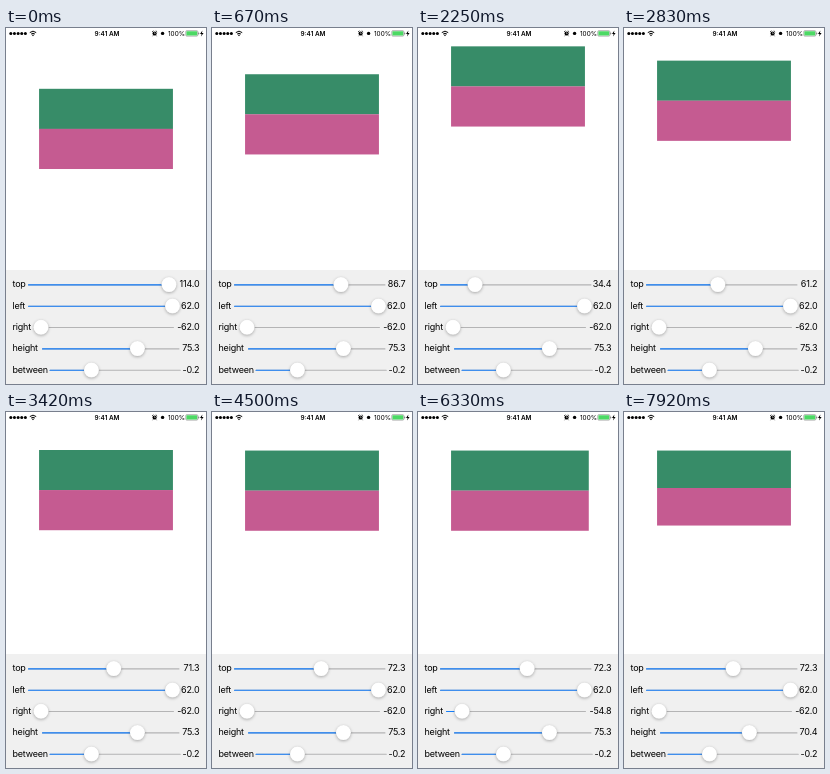
Animation of 200x356 px, one loop 8000 ms. Source, as an HTML page:

```html
<!DOCTYPE html>
<html lang="en">
<head>
<meta charset="utf-8">
<title>Layout sliders</title>
<style>
  html, body { margin: 0; width: 100%; height: 100%; overflow: hidden; background: #fff; }
  svg { display: block; width: 100%; height: 100%; }
  text { font: 9px Inter, Roboto, "Liberation Sans", sans-serif; letter-spacing: -.2px; }
  .status text { font-size: 6.4px; letter-spacing: 0; }
  .status .clock { font-weight: 600; text-anchor: middle; }
  .value { text-anchor: end; }
  .track { fill: #b4b4b5; }
  .fill { fill: #147efb; }
  .thumb { fill: #fff; stroke: rgba(0, 0, 0, .1); stroke-width: .3; filter: drop-shadow(0 1.4px 1.5px rgba(0, 0, 0, .28)); }
</style>
</head>
<body>
<svg viewBox="0 0 200 356">
  <rect width="200" height="356" fill="#fff"/>
  <g class="status">
    <g id="signal"></g>
    <g fill="none" stroke="#000" stroke-width="1">
      <path d="M23.8 4.6Q27 1.7 30.2 4.6M25.1 6.1Q27 4.3 28.9 6.1"/>
    </g>
    <path d="M25.9 7Q27 6 28.1 7L27 8.2Z"/>
    <text class="clock" x="101" y="7.8">9:41 AM</text>
    <circle cx="148.6" cy="5.5" r="2.1"/>
    <path d="M146 4L147.4 2.7M151.2 4L149.8 2.7M147.2 7.4L146.6 8.2M150 7.4L150.6 8.2" stroke="#000" stroke-width=".7"/>
    <path d="M148.6 4.2V5.6H149.7" fill="none" stroke="#fff" stroke-width=".5"/>
    <circle cx="156.6" cy="5.4" r="1.7"/>
    <text x="162" y="7.8">100%</text>
    <rect x="179.8" y="2.7" width="12" height="5.4" rx="1" fill="#fff" stroke="#555" stroke-width=".45"/>
    <rect x="180.4" y="3.3" width="10.8" height="4.2" rx=".5" fill="#4cd964"/>
    <path d="M192.4 4.4q.9 .2 .9 1t-.9 1z" fill="#555"/>
    <path d="M196.4 2.6L194 5.9H195.6L195 8.4L197.6 4.9H196Z"/>
  </g>
  <rect id="green" fill="#378c68"/>
  <rect id="pink" fill="#c55b91"/>
  <rect y="242" width="200" height="114" fill="#f0f0f0"/>
  <g id="sliders"></g>
</svg>
<script>
  const LOOP = 8000, FPS = 12, SCALE = 200 / 375;

  // Knots are [tick, value] pairs
  const tracks = {
    top: [[1, 114], [9, 82], [16, 48.7], [21, 36.5], [25, 33.8], [26, 33.8], [27, 34.4],
          [34, 61.2], [39, 70], [43, 71.8], [44, 71.8], [45, 72.3]],
    left: [[0, 62]],
    right: [[62, -62], [63, -61.5], [64, -61.5], [70, -40], [71, -40], [76, -54.8], [81, -62]],
    height: [[93, 75.3], [94, 73.4], [95, 70.4]],
    between: [[0, -.2]]
  };

  const ranges = {
    top: { min: 14, max: 114, from: 22, to: v => v >= 99.95 ? 170 : 173.5 },
    left: { min: -38, max: 62, from: 22, to: () => 173.5 },
    right: { min: -62, max: 38, from: 28, to: () => 168 },
    height: { min: 3.7, max: 103.7, from: 36, to: () => 173.5 },
    between: { min: -30, max: 70, from: 43.5, to: () => 174.8 }
  };

  const svgEl = (parent, tag, attrs) => {
    const el = document.createElementNS('http://www.w3.org/2000/svg', tag);
    parent.append(el);
    return setAttrs(el, attrs);
  };
  const setAttrs = (el, attrs) => {
    for (const k in attrs) el.setAttribute(k, attrs[k]);
    return el;
  };
  const $ = id => document.getElementById(id);

  // Monotone cubic interpolation, held at both ends
  function sample(knots, x) {
    const last = knots.length - 1;
    if (x <= knots[0][0]) return knots[0][1];
    if (x >= knots[last][0]) return knots[last][1];
    const i = knots.findIndex(k => k[0] > x) - 1;
    const slope = j => (knots[j + 1][1] - knots[j][1]) / (knots[j + 1][0] - knots[j][0]);
    const tangent = j => {
      if (j === 0 || j === last) return 0;
      const a = slope(j - 1), b = slope(j);
      return a * b > 0 ? 2 * a * b / (a + b) : 0;
    };
    const [x0, y0] = knots[i], [x1, y1] = knots[i + 1];
    const w = x1 - x0, u = (x - x0) / w, s = u * u * (3 - 2 * u);
    return y0 + (y1 - y0) * s
      + w * u * (1 - u) * ((1 - u) * tangent(i) - u * tangent(i + 1));
  }

  for (let i = 0; i < 5; i++)
    svgEl($('signal'), 'circle', { cx: 4.8 + 3.65 * i, cy: 5.4, r: 1.5 });

  const rows = Object.keys(tracks).map((name, i) => {
    const y = 256.6 + i * 40 * SCALE, g = $('sliders');
    const bar = { x: ranges[name].from, y: y - .3, height: 1.1, rx: .5 };
    svgEl(g, 'text', { x: 6.5, y: y + 2.8 }).textContent = name;
    return {
      name,
      track: svgEl(g, 'rect', { ...bar, class: 'track' }),
      fill: svgEl(g, 'rect', { ...bar, class: 'fill' }),
      thumb: svgEl(g, 'circle', { class: 'thumb', cy: y, r: 7.5 }),
      value: svgEl(g, 'text', { class: 'value', x: 193.4, y: y + 2.8 })
    };
  });

  function draw(ms) {
    const tick = Math.floor((ms % LOOP + 4) * FPS / 1000) % (LOOP * FPS / 1000);
    const now = {};
    for (const { name, track, fill, thumb, value } of rows) {
      const v = now[name] = sample(tracks[name], tick);
      const { min, max, from, to } = ranges[name], end = to(v);
      const x = from + 7 + (end - from - 14) * (v - min) / (max - min);
      setAttrs(track, { width: end - from });
      setAttrs(fill, { width: x - from });
      setAttrs(thumb, { cx: x });
      value.textContent = v.toFixed(1);
    }
    const h = now.height * SCALE, y = now.top * SCALE, x = now.left * SCALE;
    const box = { x, width: 200 + -now.right * -SCALE - x, height: h };
    setAttrs($('green'), { ...box, y });
    setAttrs($('pink'), { ...box, y: y + h + now.between * SCALE });
  }

  const start = performance.now();
  function loop() {
    draw(performance.now() - start);
    requestAnimationFrame(loop);
  }
  loop();
</script>
</body>
</html>
```
